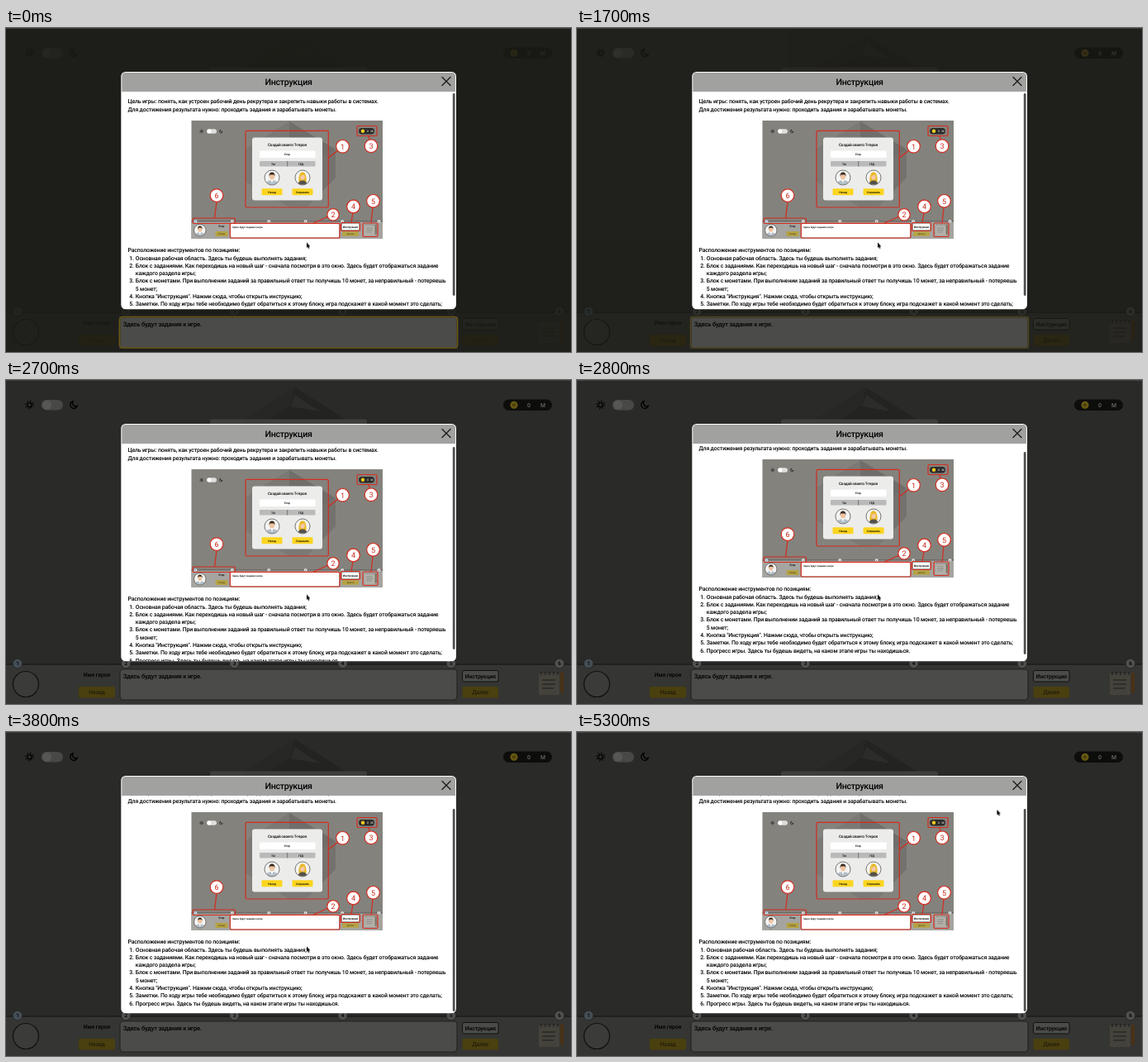
These frames come from a looping animation (684 by 392 pixels, 5.4 s). An HTML page:

```html
<!DOCTYPE html>
<html lang="ru">
<head>
<meta charset="utf-8">
<title>Инструкция</title>
<style>
html, body { margin: 0; width: 100%; height: 100%; overflow: hidden; background: #2a2a28; }
svg { display: block; width: 684px; height: 392px; }
text { font: 500 6.9px Roboto, "Liberation Sans", sans-serif; letter-spacing: -.023em; text-rendering: geometricPrecision; }
.mid { text-anchor: middle; }
.title { font-size: 10.6px; }
.task { font-size: 7.5px; }
.heading { font-size: 4.7px; }
.tiny { font-size: 3.4px; }
.micro { font-size: 2.95px; }
.num { font-size: 9px; font-weight: 400; fill: #c8281c; }
.mark { fill: none; stroke: #d42c1e; stroke-width: 1.2; }
.badge { fill: #fff; stroke: #d42c1e; stroke-width: 1.2; }

#spot, #glow, #scroll, #thumb, #cursor { animation: 5.4s infinite step-end; }
#spot { animation-name: spot; }
#glow { animation-name: glow; }
#scroll { animation-name: scroll; }
#thumb { animation-name: thumb; }
#cursor { animation-name: cursor; }

@keyframes spot {
  0%, 31.47% { opacity: 1; animation-timing-function: steps(5, start); }
  40.73%, 100% { opacity: 0; }
}
@keyframes glow {
  0% { opacity: 1; }
  1.85% { opacity: 1; animation-timing-function: steps(4, start); }
  9.25% { opacity: .75; }
  20.36% { opacity: .7; }
  31.47% { opacity: .7; animation-timing-function: steps(5, start); }
  40.73%, 100% { opacity: 0; }
}
@keyframes scroll {
  0% { transform: translateY(0); }
  49.99% { transform: translateY(-4px); }
  51.84% { transform: translateY(-16px); }
  70.36%, 100% { transform: translateY(-15px); }
}
@keyframes thumb {
  0% { transform: translateY(0); }
  49.99% { transform: translateY(2px); }
  51.84% { transform: translateY(8px); }
  53.69%, 100% { transform: translateY(14px); }
}
@keyframes cursor {
  0% { transform: translate(364px, 259.5px); }
  83.32% { transform: translate(376px, 247px); }
  85.17% { transform: translate(405px, 217px); }
  87.03% { transform: translate(442px, 176px); }
  88.88% { transform: translate(476px, 136px); }
  90.73% { transform: translate(500px, 109px); }
  92.58% { transform: translate(508px, 99px); }
  94.43% { transform: translate(508px, 97px); }
  96.29% { transform: translate(508.4px, 95px); }
  98.14%, 100% { transform: translate(508.4px, 94px); }
}
</style>
</head>
<body>
<svg viewBox="0 0 684 392">
  <defs>
    <clipPath id="view"><rect x="140" y="77" width="404.500" height="262.500"/></clipPath>
    <clipPath id="face"><circle r="8.6"/></clipPath>
    <g id="sun">
      <circle r="2.7" fill="none" stroke="#000" stroke-width="1.3"/>
      <circle r="4.7" fill="none" stroke="#000" stroke-width="1.5" stroke-dasharray="1.3 2.39"/>
    </g>
    <path id="moon" d="M-1-4.3A4.4 4.4 0 1 0 4.3 1.3 4 4 0 0 1-1-4.3Z" fill="none" stroke="#000" stroke-width="1.3"/>
    <g id="pad">
      <rect x="-14" y="-12" width="25" height="26"/>
      <path d="M-11-14v4M-6-14v4M-1-14v4M4-14v4M9-14v4M-10-4H6M-10 1H6M-10 6H4" fill="none" stroke="#1a1a18"/>
      <path d="M12-13h4v22l-2 5-2-5Z" fill="#4a3216"/>
    </g>
    <g id="man" clip-path="url(#face)">
      <rect x="-9" y="-9" width="18" height="18" fill="#f4f4f2"/>
      <path d="M-8 9Q-7 3 0 3 7 3 8 9Z" fill="#b3bfc8"/>
      <path d="M-1.6 2h3.2L0 7Z" fill="#fff"/>
      <ellipse cy="-1.5" rx="3" ry="4" fill="#f0c3a0"/>
      <path d="M-3.4-1Q-4-6.5 0-6.5 4-6.5 3.4-1L2.5-3.6H-2.5Z" fill="#3a2b22"/>
    </g>
    <g id="woman" clip-path="url(#face)">
      <rect x="-9" y="-9" width="18" height="18" fill="#f4f4f2"/>
      <path d="M-4.6 5Q-5-6.8 0-6.8 5-6.8 4.6 5Z" fill="#e9b820"/>
      <path d="M-6 9Q-5 3.5 0 3.5 5 3.5 6 9Z" fill="#55524c"/>
      <ellipse cy="-1" rx="2.8" ry="3.8" fill="#f3c9a8"/>
      <path d="M-2.9-1.5Q-2-5 0-5 2-5 2.9-1.5L1-3.6Z" fill="#e9b820"/>
    </g>
  </defs>

  <!-- dimmed game page -->
  <rect width="684" height="392" fill="#2a2a28"/>
  <path d="M350 9 412 48H288Z" fill="#232321"/>
  <path d="M350 9 345 30 318 48H288Z" fill="#272725"/>
  <path d="M350 18 380 38 345 32Z" fill="#2c2c2a"/>
  <rect x="247" y="47.500" width="190" height="20" rx="3" fill="#403f3d"/>
  <use href="#sun" x="28.500" y="30"/>
  <rect x="43" y="24" width="26" height="12.500" rx="6.200" fill="#484846"/>
  <circle cx="49.500" cy="30.200" r="5.600" fill="#565654"/>
  <use href="#moon" x="82" y="30"/>
  <rect x="602" y="23.500" width="59" height="13.500" rx="6.700" fill="#0d0d0c"/>
  <circle cx="615" cy="30.300" r="4.500" fill="#6b5b10"/>
  <circle cx="615" cy="30.300" r="2.400" fill="#4d420e"/>
  <text class="mid" x="633" y="32.700" fill="#6a6a68">0</text>
  <text class="mid" x="650" y="32.700" fill="#6a6a68">М</text>

  <rect y="344" width="684" height="48" fill="#353533"/>
  <path d="M0 344H684" stroke="#1b1b1a" stroke-width="1.500"/>
  <g id="steps"></g>
  <circle cx="24" cy="368" r="15.500" fill="#3b3b39" stroke="#101010" stroke-width="1.200"/>
  <text class="mid" x="110" y="358.600">Имя героя</text>
  <rect x="88" y="371" width="44" height="13.500" rx="2" fill="#4a3f0e"/>
  <text class="mid" x="110" y="380.200" fill="#211d0a">Назад</text>
  <rect x="138" y="350" width="408" height="37" rx="4" fill="#4b4b49" stroke="#232322" stroke-width="1.200"/>
  <rect x="552.500" y="351.500" width="43.500" height="13.500" rx="2" fill="#4b4b49" stroke="#111"/>
  <text class="mid" x="574.300" y="360.800">Инструкция</text>
  <rect x="552.500" y="371" width="43.500" height="13.500" rx="2" fill="#4a3f0e"/>
  <text class="mid" x="574.300" y="380.200" fill="#211d0a">Далее</text>
  <use href="#pad" x="659" y="367" fill="#44423a"/>

  <path id="spot" d="M0 0H684V392H0ZM137 349V388H547V349Z" fill-rule="evenodd" fill="#1c1c17" fill-opacity=".82"/>
  <rect id="glow" x="137.500" y="349.500" width="409" height="37.500" rx="4" fill="none" stroke="#6b5a17" stroke-width="1.700"/>
  <text class="task" x="141.800" y="361">Здесь будут задания к игре.</text>
  <path d="M0 .4H684" stroke="#4c4c4a" stroke-width=".8"/>

  <!-- instruction window -->
  <rect x="139.300" y="53" width="405.700" height="287.300" rx="5.500" fill="#fff"/>
  <path d="M140.300 77V58.500Q140.300 54 145 54H539.300Q544 54 544 58.500V77Z" fill="#a1a1a0"/>
  <text class="mid title" x="342" y="69.200">Инструкция</text>
  <path d="M528 59.500 538 69.500M538 59.500 528 69.500" stroke="#1c1c1c" stroke-width="1.300" stroke-linecap="round"/>

  <g clip-path="url(#view)">
    <g id="scroll">
      <g id="copy"></g>

      <!-- picture of the game screen -->
      <rect x="224.500" y="112" width="231.500" height="143" fill="#84827d"/>
      <path d="M343 113 399 147V181L365 216 343 217 290 186V146Z" fill="#7b7975"/>
      <path d="M343 113 399 147 383 156 343 132Z" fill="#706e6a"/>
      <path d="M383 156 399 147V181L383 197Z" fill="#74726e"/>
      <use href="#sun" transform="translate(236.700 125) scale(.42)"/>
      <rect x="243" y="122.300" width="12" height="5.400" rx="2.700" fill="#dededc"/>
      <circle cx="246" cy="125" r="2.400" fill="#fff"/>
      <use href="#moon" transform="translate(260.300 125) scale(.42)"/>
      <rect x="427" y="121" width="19" height="7.500" rx="3.700" fill="#2b2b2a"/>
      <circle cx="432" cy="124.800" r="2.200" fill="#f2cb1e"/>
      <text class="mid tiny" x="438" y="126" fill="#ddd">0</text>
      <text class="mid tiny" x="443" y="126" fill="#ddd">М</text>

      <rect x="298" y="132.500" width="85" height="76" rx="3" fill="#ececeb"/>
      <text class="mid heading" x="340.500" y="143.200">Создай своего Т-героя</text>
      <rect x="307" y="148.500" width="67.500" height="8.500" rx="1" fill="#fff"/>
      <text class="mid tiny" x="340.500" y="154">Егор</text>
      <rect x="307" y="161" width="67.500" height="6.500" rx="1" fill="#bababa"/>
      <path d="M340.700 161v6.500" stroke="#555" stroke-width=".7"/>
      <text class="mid tiny" x="323.500" y="165.500">ТЫ</text>
      <text class="mid tiny" x="357" y="165.500">ГЕД</text>
      <use href="#man" x="322" y="181"/>
      <use href="#woman" x="359" y="181"/>
      <g fill="none" stroke="#444" stroke-width=".7">
        <circle cx="322" cy="181" r="9"/><circle cx="359" cy="181" r="9"/>
      </g>
      <g fill="#fbd51f">
        <rect x="309.500" y="194.300" width="25" height="8" rx="1.200"/>
        <rect x="346.500" y="194.300" width="25" height="8" rx="1.200"/>
      </g>
      <text class="mid tiny" x="322" y="199.500">Назад</text>
      <text class="mid tiny" x="359" y="199.500">Сохранить</text>

      <rect x="224.500" y="234" width="231.500" height="21" fill="#a5a4a0"/>
      <path d="M224.500 234H456" stroke="#4a4a48" stroke-width=".8"/>
      <g id="miniSteps"></g>
      <use href="#man" transform="translate(234.800 244.800) scale(.82)"/>
      <circle cx="234.800" cy="244.800" r="7.200" fill="none" stroke="#444" stroke-width=".6"/>
      <text class="mid tiny" x="261" y="241">Егор</text>
      <rect x="253.500" y="246" width="15" height="6" rx=".8" fill="#b5a243"/>
      <text class="mid micro" x="261" y="250" fill="#5c5220">Назад</text>
      <rect x="272" y="237" width="131" height="16.500" rx="1" fill="#fff"/>
      <text class="micro" x="274" y="241.500">Здесь будут задания к игре.</text>
      <rect x="407" y="237" width="20" height="7" rx=".8" fill="#fff"/>
      <text class="mid tiny" x="417" y="241.700">Инструкция</text>
      <rect x="407" y="246.300" width="20" height="5.500" rx=".8" fill="#b5a243"/>
      <text class="mid micro" x="417" y="250" fill="#5c5220">Далее</text>
      <use href="#pad" transform="translate(441 244) scale(.48)" fill="#c4c1b6" opacity=".45"/>
      <g id="marks"></g>
    </g>
    <rect id="thumb" x="540.800" y="79" width="2.800" height="245" rx="1.400" fill="#505050"/>
  </g>

  <path id="cursor" d="M0 0V6.400L1.400 5.200 2.400 7.500 3.500 7 2.500 4.800H4.400Z" fill="#000" stroke="#fff" stroke-width=".5" paint-order="stroke"/>
</svg>
<script>
const add = (id, html) => document.getElementById(id).innerHTML += html;

// progress dots along a line
const dots = (id, x, gap, y, r, first, fill, edge) => {
  for (let i = 0; i < 6; i++) {
    add(id, `<circle cx="${x + gap * i}" cy="${y}" r="${r}" fill="${i ? fill : first}" stroke="${edge}" stroke-width="${r / 8}"/>
      <text class="mid" style="font-size:${r * 1.1}px" x="${x + gap * i}" y="${y + r * .4}">${i + 1}</text>`);
  }
};
dots('steps', 14, 131.2, 343, 5.8, '#454d56', '#50504e', '#20201f');
dots('miniSteps', 229.5, 44.4, 234, 2.1, '#d4e2f4', '#f2f2f1', '#555');

const line = (y, s, x = 147.5) => add('copy', `<text x="${x}" y="${y}">${s}</text>`);
line(91, 'Цель игры: понять, как устроен рабочий день рекрутера и закрепить навыки работы в системах.');
line(100.5, 'Для достижения результата нужно: проходить задания и зарабатывать монеты.');
line(271.2, 'Расположение инструментов по позициям:');
const items = [
  ['Основная рабочая область. Здесь ты будешь выполнять задания;'],
  ['Блок с заданиями. Как переходишь на новый шаг - сначала посмотри в это окно. Здесь будет отображаться задание', 'каждого раздела игры;'],
  ['Блок с монетами. При выполнении заданий за правильный ответ ты получишь 10 монет, за неправильный - потеряешь', '5 монет;'],
  ['Кнопка "Инструкция". Нажми сюда, чтобы открыть инструкцию;'],
  ['Заметки. По ходу игры тебе необходимо будет обратиться к этому блоку, игра подскажет в какой момент это сделать;'],
  ['Прогресс игры. Здесь ты будешь видеть, на каком этапе игры ты находишься.']
];
let y = 271.2;
items.forEach((rows, i) => rows.forEach((row, k) => {
  y += 9.3;
  if (!k) line(y, `${i + 1}.`, 149.3);
  line(y, row, 156.8);
}));

// numbered callouts: frame x, y, w, h; leader path; badge centre
const callout = (n, x, y, w, h, leader, cx, cy, r = 7.8) => add('marks',
  `<rect class="mark" x="${x}" y="${y}" width="${w}" height="${h}" rx="1.5"/><path class="mark" d="${leader}"/>
   <circle class="badge" cx="${cx}" cy="${cy}" r="${r}"/><text class="mid num" x="${cx}" y="${cy + 3.2}">${n}</text>`);
callout(1, 290, 124.3, 100.3, 92.7, 'M390.3 157 402 148', 407.5, 143.3);
callout(2, 271.3, 236.3, 132.7, 17.7, 'M372 236.3 390 228', 396, 225.8, 7.2);
callout(3, 425, 118.5, 24, 12, 'M438.500 130.500 441 136', 442, 142.8);
callout(4, 405.5, 235.5, 23, 10, 'M418 235.500 420 223', 420.5, 216);
callout(5, 432, 236, 18, 16.500, 'M442 236 444 217', 444.5, 209.3);
callout(6, 226, 230, 51.5, 6.5, 'M252.500 230 255 210', 255, 202.6);
</script>
</body>
</html>
```
